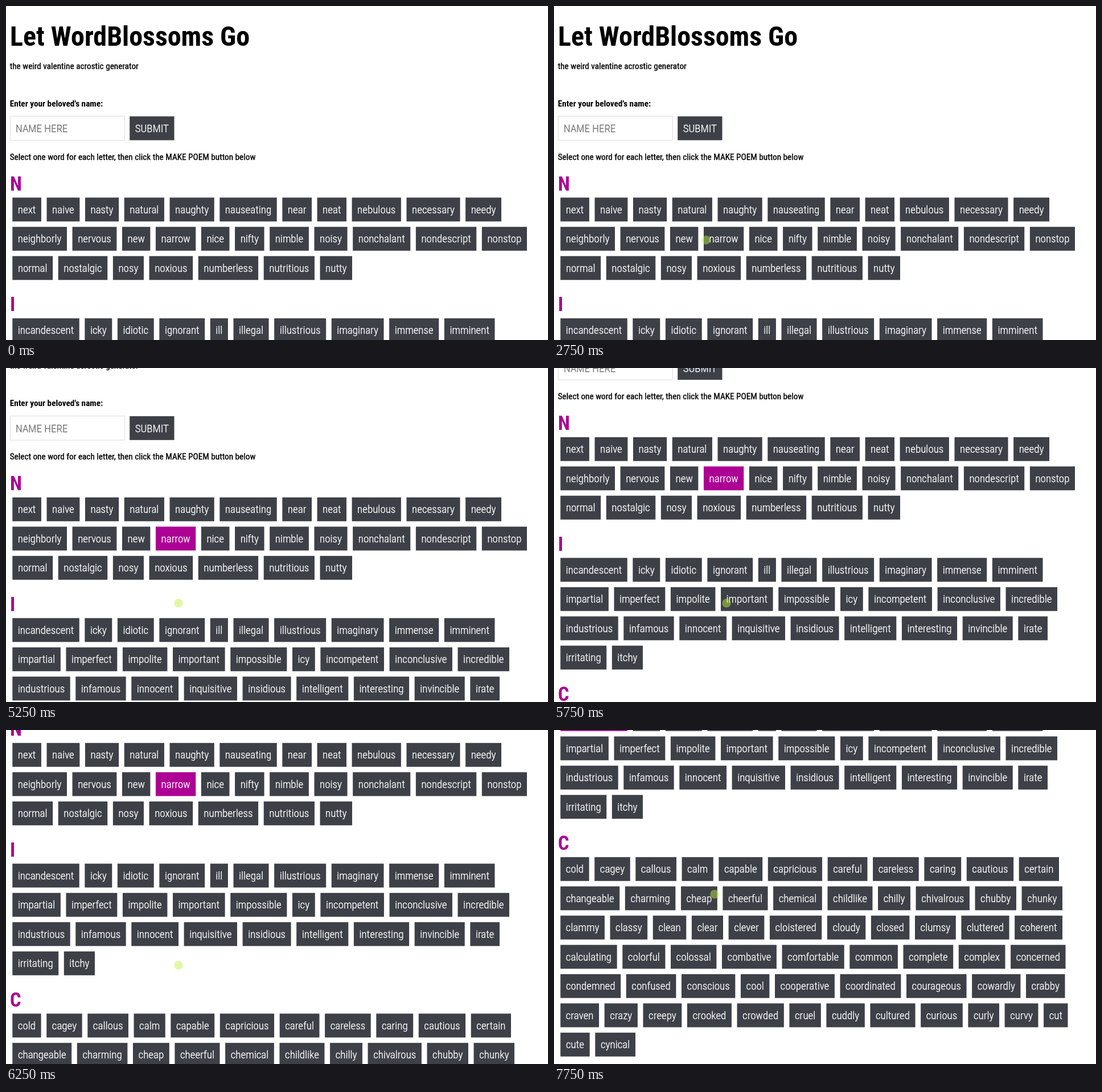
An HTML page with a canvas that plays this animation: 952x588 px, repeating every 8 s.

```html
<!DOCTYPE html>
<html lang="en">
<head>
<meta charset="utf-8">
<title>Acrostic generator</title>
<style>
  html, body { margin: 0; width: 100%; height: 100%; overflow: hidden; background: #fff; }
  canvas { display: block; }
</style>
</head>
<body>
<canvas id="stage" width="952" height="588"></canvas>
<script>
const ctx = document.getElementById('stage').getContext('2d');
const LOOP = 8000, STEP = 250;
const DARK = '#3d4047', PINK = '#ad0094';
const LEFT = 11.3, GAP = 9.6, PITCH = 51.5, BOX_H = 42;

// Each row: its right edge, then its words.
const sections = [
  { letter: 'N', top: 337.3, rows: [
    [870, 'next naive nasty natural naughty nauseating near neat nebulous necessary needy'],
    [915, 'neighborly nervous new narrow nice nifty nimble noisy nonchalant nondescript nonstop'],
    [608, 'normal nostalgic nosy noxious numberless nutritious nutty']] },
  { letter: 'I', top: 549.8, rows: [
    [858.5, 'incandescent icky idiotic ignorant ill illegal illustrious imaginary immense imminent'],
    [884, 'impartial imperfect impolite important impossible icy incompetent inconclusive incredible'],
    [867, 'industrious infamous innocent inquisitive insidious intelligent interesting invincible irate'],
    [156, 'irritating itchy']] },
  { letter: 'C', top: 813.8, rows: [
    [887, 'cold cagey callous calm capable capricious careful careless caring cautious certain'],
    [893, 'changeable charming cheap cheerful chemical childlike chilly chivalrous chubby chunky'],
    [893, 'clammy classy clean clear clever cloistered cloudy closed clumsy cluttered coherent'],
    [898.5, 'calculating colorful colossal combative comfortable common complete complex concerned'],
    [897.5, 'condemned confused conscious cool cooperative coordinated courageous cowardly crabby'],
    [902.5, 'craven crazy creepy crooked crowded cruel cuddly cultured curious curly curvy cut'],
    [143, 'cute cynical']] }
];

// Time at which a word becomes selected.
const picked = { narrow: 4000, incandescent: 7250 };

// [time, scroll]
const scrollKeys = [[0, 0], [4750, 0], [5250, 109.5], [5750, 215.5], [6250, 314.5],
  [6500, 318], [7500, 318], [7750, 590]];

// [time, x, y]
const pointerKeys = [[250, 585, 76], [750, 270, 285], [1000, 150, 350], [1250, 116, 369],
  [1500, 135, 367], [2000, 235, 356], [2500, 304, 361], [2750, 267, 412], [3000, 249, 436],
  [3750, 303, 414], [6500, 303, 414], [7000, 110, 262], [7250, 75, 255], [7500, 80, 258],
  [7750, 282, 289]];

function sample(keys, t) {
  const next = keys.findIndex(k => k[0] > t);
  if (next < 0) return keys[keys.length - 1].slice(1);
  if (next === 0) return keys[0].slice(1);
  const a = keys[next - 1], b = keys[next];
  const p = (t - a[0]) / (b[0] - a[0]);
  return a.slice(1).map((v, i) => v + (b[i + 1] - v) * p);
}

function setFont(size, weight) {
  ctx.font = `${weight} ${size}px "Roboto Condensed", Roboto, sans-serif`;
  ctx.fontStretch = 'condensed';
}

// Narrow the regular face only where no condensed one is available.
setFont(100, 300);
const narrowing = ctx.measureText('incandescent').width > 555 ? 0.88 : 1;

// A hairline outline gives small text the fuller look of smoothed screen type.
function text(str, x, y, size, weight, color) {
  setFont(size, weight);
  ctx.fillStyle = ctx.strokeStyle = color;
  ctx.save();
  ctx.translate(x, y);
  ctx.scale(narrowing, 1);
  ctx.fillText(str, 0, 0);
  if (weight < 700) {
    ctx.lineWidth = 0.35;
    ctx.lineJoin = 'round';
    ctx.strokeText(str, 0, 0);
  }
  ctx.restore();
}

function box(x, y, w, h, color) {
  ctx.fillStyle = color;
  ctx.fillRect(x, y, w, h);
}

function layoutRow(right, line, y) {
  setFont(19, 300);
  const words = line.split(' ');
  const widths = words.map(w => ctx.measureText(w).width * narrowing);
  const used = widths.reduce((a, b) => a + b, 0) + GAP * (words.length - 1);
  const pad = (right - LEFT - used) / (2 * words.length);
  let x = LEFT;
  return words.map((word, i) => {
    const button = { word, x, y, pad, w: widths[i] + 2 * pad };
    x += button.w + GAP;
    return button;
  });
}

const buttons = sections.flatMap(s =>
  s.rows.flatMap(([right, line], i) => layoutRow(right, line, s.top + i * PITCH)));

function drawHeader(dy) {
  text('Let WordBlossoms Go', 7, 70 + dy, 48, 700, '#000');
  text('the weird valentine acrostic generator', 6.7, 110.5 + dy, 15.25, 400, '#000');
  text("Enter your beloved's name:", 6.7, 176.5 + dy, 15.25, 700, '#000');
  ctx.strokeStyle = '#dcdcdc';
  ctx.lineWidth = 1;
  ctx.strokeRect(7.3, 194 + dy, 201, 42.5);
  text('NAME HERE', 17, 222 + dy, 19, 300, '#707070');
  box(217.2, 194.3 + dy, 78.3, BOX_H, DARK);
  text('SUBMIT', 226.7, 222 + dy, 19, 300, '#fff');
  text('Select one word for each letter, then click the MAKE POEM button below',
    6.7, 270.5 + dy, 15.25, 400, '#000');
}

function drawPointer(t) {
  const hidden = t < 250 || (t >= 4500 && t < 5000);
  if (hidden) return;
  const [x, y] = sample(pointerKeys, t);
  ctx.fillStyle = 'rgba(190, 240, 65, 0.47)';
  ctx.beginPath();
  ctx.arc(x, y, 7.7, 0, Math.PI * 2);
  ctx.fill();
}

function draw(t) {
  const dy = -sample(scrollKeys, t)[0];
  ctx.fillStyle = '#fff';
  ctx.fillRect(0, 0, 952, 588);
  drawHeader(dy);
  for (const s of sections) text(s.letter, 7, s.top - 12.8 + dy, 34.2, 700, PINK);
  for (const b of buttons) {
    const y = b.y + dy;
    if (y > 588 || y < -BOX_H) continue;
    box(b.x, y, b.w, BOX_H, t >= picked[b.word] ? PINK : DARK);
    text(b.word, b.x + b.pad, y + 27.6, 19, 300, '#fff');
  }
  drawPointer(t);
}

function tick() {
  const t = performance.now() % LOOP;
  draw(Math.floor(t / STEP) * STEP);
  requestAnimationFrame(tick);
}
tick();
</script>
</body>
</html>
```
